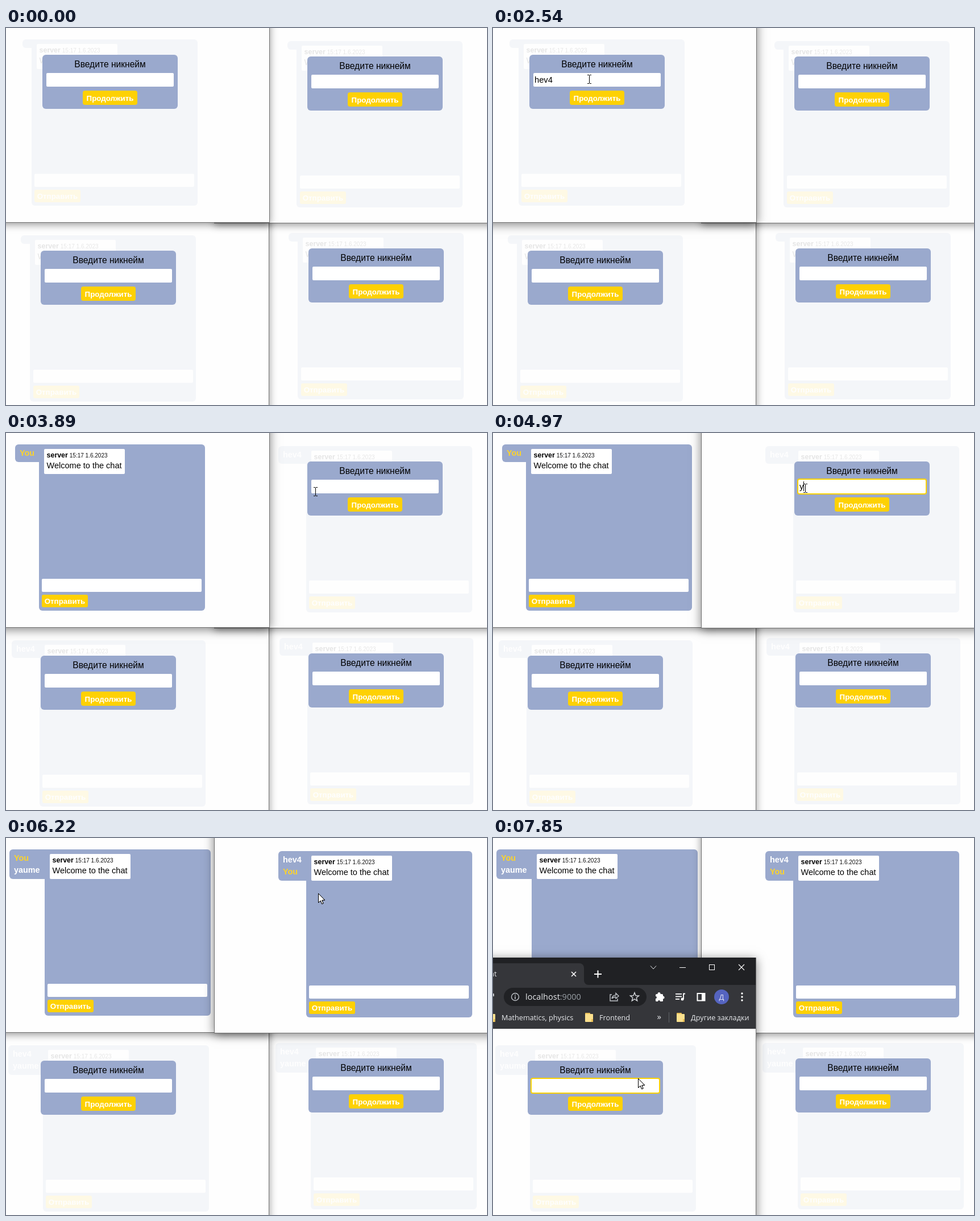
Recreate the animation shown at these times as an HTML page with a canvas. Size 846x662 px, loop 8000 ms.

```html
<!DOCTYPE html>
<html lang="ru">
<head>
<meta charset="utf-8">
<title>Chat windows</title>
<style>
html, body { margin: 0; width: 100%; height: 100%; overflow: hidden; background: #fefefe; }
canvas { display: block; }
</style>
</head>
<body>
<canvas id="stage" width="846" height="662"></canvas>
<script>
const ctx = document.getElementById('stage').getContext('2d');
const LOOP = 8000;
const SANS = '"Liberation Sans", Arial, sans-serif';
const UI = '"Open Sans", "Noto Sans", sans-serif';
const BLUE = '#9aa9cd', GOLD = '#fed103', PAGE = '#fefefe';
const FIRST = 'hev4', SECOND = 'yaume';

// Window rectangles as [left, top, right, bottom]; cx and dy place the chat inside.
const wins = {
  tl: { box: [-60, -60, 464, 342], cx: 183, dy: 0 },
  tr: { box: [366, -60, 920, 343], cx: 649.2, dy: 3 },
  bl: { box: [-60, 210, 463, 740], cx: 180.3, dy: 344 },
  br: { box: [440, 200, 920, 740], cx: 651.2, dy: 340 }
};

// Pointer stops: time, shape, x, y.
const pointer = [
  [0, ''], [370, 'arrow', 110, 143], [490, 'arrow', 158, 120],
  [640, 'beam', 169, 94], [790, 'beam', 169, 90], [2660, 'arrow', 168, 89],
  [3530, 'arrow', 232, 108], [3650, 'arrow', 352, 120],
  [3770, 'arrow', 474, 114], [3890, 'beam', 544, 103],
  [4040, 'beam', 549, 97], [6100, 'arrow', 549, 97],
  [6780, 'arrow', 478, 226], [6900, 'arrow', 371, 364],
  [7050, 'beam', 230, 429], [7480, 'arrow', 255, 422]
];

const keys = { tl: [1870, 2020, 2170, 2290], tr: [4970, 5120, 5370, 5520, 5800] };
const typedName = { tl: FIRST, tr: SECOND };
const focus = { tl: [940, 2540], tr: [4040, 5950], bl: [7330, LOOP] };
const caretOn = [[940, 1340], [1870, 2540], [4040, 4570], [4970, 5950], [7330, 7850]];

const within = (t, span) => span && t >= span[0] && t < span[1];

function rect(x, y, w, h, color, r = 0) {
  ctx.fillStyle = color;
  ctx.beginPath();
  ctx.roundRect(x, y, w, h, r);
  ctx.fill();
}

function text(str, x, y, font, color, align = 'left') {
  ctx.font = font;
  ctx.fillStyle = color;
  ctx.textAlign = align;
  ctx.fillText(str, x, y);
}

function line(points, color, width = 1, closed = false) {
  ctx.strokeStyle = color;
  ctx.lineWidth = width;
  ctx.beginPath();
  points.forEach(([x, y]) => ctx.lineTo(x, y));
  if (closed) ctx.closePath();
  ctx.stroke();
}

function disc(x, y, r, color) {
  ctx.fillStyle = color;
  ctx.beginPath();
  ctx.arc(x, y, r, 0, 7);
  ctx.fill();
}

function cross(x, y, r, color, width) {
  line([[x - r, y - r], [x + r, y + r]], color, width);
  line([[x - r, y + r], [x + r, y - r]], color, width);
}

function members(id, t) {
  const joined = id === 'tl' ? 6220 : 6100;
  const list = t >= joined ? [FIRST, SECOND] : t >= 2660 ? [FIRST] : [];
  const own = id === 'tl' ? FIRST : id === 'tr' && t >= 6220 ? SECOND : '';
  return list.map(name => name === own ? 'You' : name);
}

function drawChat(win, names) {
  const { cx, dy } = win;
  const bold = '700 14.4px ' + SANS;
  ctx.font = bold;
  const tabW = 16 + Math.max(0, ...names.map(n => ctx.measureText(n).width));
  const exact = cx + (tabW - 292) / 2;
  const x = Math.round(exact), left = Math.round(exact - tabW);
  const inner = Math.round(exact + 5.4);

  rect(left, 20 + dy, x - left, names.length ? 10 + 21 * names.length : 15, BLUE, [6, 0, 0, 6]);
  rect(x, 20 + dy, 292, 292, BLUE, [0, 6, 6, 6]);
  names.forEach((n, i) =>
    text(n, left + 8, 40 + 21 * i + dy, bold, n === 'You' ? '#fcd32c' : '#fff'));

  const mx = Math.round(exact + 9);
  rect(mx, 28 + dy, 142, 44, '#fff', 2);
  text('server', mx + 4.6, 43 + dy, '700 12.4px ' + SANS, '#000');
  text('15:17 1.6.2023', mx + 44.8, 43 + dy, '10px ' + SANS, '#111');
  text('Welcome to the chat', mx + 4.6, 62 + dy, '14.5px ' + SANS, '#000');

  rect(inner, 256 + dy, 281, 23, '#fff', 2);
  rect(inner, 284 + dy, 81, 22, GOLD, 3);
  text('Отправить', inner + 40.5, 299.5 + dy, '700 13.33px ' + SANS, '#fff', 'center');
}

function drawDialog(id, t) {
  const win = wins[id], dy = win.dy;
  const x = Math.round(win.cx) - 119, mid = x + 119;
  const field = x + 7, active = within(t, focus[id]);
  rect(x, 47 + dy, 238, 95, BLUE, 6);
  text('Введите никнейм', mid, 69 + dy, '15.6px ' + SANS, '#000', 'center');
  if (active) rect(field - 2, 77 + dy, 228, 28, GOLD, 4);
  rect(field, 79 + dy, 224, 24, '#fff', 2);

  const count = (keys[id] || []).filter(k => t >= k).length;
  const value = (typedName[id] || '').slice(0, count);
  const font = '14.7px ' + SANS;
  text(value, field + 2, 96 + dy, font, '#000');
  if (active && caretOn.some(span => within(t, span))) {
    rect(Math.round(field + 2 + ctx.measureText(value).width), 82 + dy, 1, 17, '#000');
  }

  rect(mid - 48, 110 + dy, 96, 25, GOLD, 4);
  text('Продолжить', mid, 128 + dy, '700 13.33px ' + SANS, '#fff', 'center');
}

function folder(x) {
  rect(x, 307, 9, 5, '#e9bf56', 1);
  rect(x, 309, 14, 14, '#fbe08d', 1);
  rect(x + 11, 318, 3, 5, '#e9bf56');
}

function drawBrowserBar() {
  const ink = '#e8eaed', bar = '#35363a', dark = '#202124';
  rect(-60, 210, 522, 48, dark);
  rect(-60, 258, 522, 77, bar);
  rect(-60, 220, 220, 38, bar, [0, 8, 0, 0]);
  rect(160, 250, 8, 8, bar);
  rect(160, 242, 16, 16, dark, [0, 0, 0, 8]);
  text('nt', -6, 243, '13px ' + UI, ink);
  cross(142, 239, 4, '#fff', 1.6);
  line([[178, 239], [191, 239]], '#fff', 2);
  line([[184.5, 232.5], [184.5, 245.5]], '#fff', 2);
  line([[277, 224.5], [282, 230], [287, 224.5]], ink);
  line([[328, 227.5], [339, 227.5]], '#fff');
  ctx.strokeRect(380.5, 222.5, 9, 9);
  cross(437, 227, 5, '#fff', 1.1);

  rect(19, 263, 251, 32, dark, 16);
  line([[-3, 274], [1, 274], [1, 278]], ink, 1.5);
  ctx.strokeStyle = '#bdc1c6';
  ctx.lineWidth = 1.4;
  ctx.beginPath();
  ctx.arc(39, 279, 6.5, 0, 7);
  ctx.stroke();
  rect(38.2, 278, 1.6, 5, '#bdc1c6');
  rect(38.2, 275, 1.6, 1.7, '#bdc1c6');
  const font = '14.5px ' + UI;
  text('localhost', 57, 284, font, ink);
  text(':9000', 57 + ctx.measureText('localhost').width, 284, font, '#9aa0a6');

  // share
  line([[209, 275], [206, 275], [206, 286], [219, 286], [219, 282]], '#bdc1c6', 1.4);
  ctx.beginPath();
  ctx.moveTo(209, 282);
  ctx.quadraticCurveTo(210, 276, 216, 276);
  ctx.lineTo(216, 272.5);
  ctx.lineTo(221, 277.5);
  ctx.lineTo(216, 282);
  ctx.lineTo(216, 279);
  ctx.quadraticCurveTo(212, 279, 209, 282);
  ctx.stroke();
  // star
  const star = Array.from({ length: 10 }, (_, i) => {
    const a = -Math.PI / 2 + i * Math.PI / 5, r = i % 2 ? 3.4 : 8;
    return [249 + r * Math.cos(a), 279.5 + r * Math.sin(a)];
  });
  line(star, '#d5d8dc', 1.4, true);
  // extensions
  rect(286, 274, 13, 13, '#fff', 1.5);
  disc(292, 273.5, 2.5, '#fff');
  disc(299, 280, 2.5, '#fff');
  disc(286, 280, 2, bar);
  disc(292, 287, 2, bar);
  // playlist
  [273, 277.5, 282].forEach((y, i) => rect(321, y, i < 2 ? 11 : 7, 1.8, '#fff'));
  line([[338, 273.5], [335, 273.5], [335, 283]], '#fff', 1.8);
  disc(333, 283, 2.5, '#fff');
  // side panel
  line([[359.5, 273], [372.5, 273], [372.5, 285.5], [359.5, 285.5]], '#fff', 2, true);
  rect(367, 273, 6, 13, '#fff');
  disc(402, 279, 13, '#5564c0');
  text('Д', 402, 283.5, '13px ' + UI, '#e4e6f5', 'center');
  [273, 279, 285].forEach(y => disc(438, y, 1.7, '#fff'));

  const mark = '12.7px ' + UI;
  folder(-10);
  text('Mathematics, physics', 15, 319.5, mark, ink);
  folder(162);
  text('Frontend', 187, 319.5, mark, ink);
  text('»', 288.5, 318.5, '15px ' + UI, ink);
  rect(309, 306, 1, 18, '#5f6368');
  folder(323);
  text('Другие закладки', 348, 319.5, mark, ink);
}

function drawWindow(id, t, front) {
  const win = wins[id], [l, top, r, b] = win.box;
  ctx.save();
  ctx.shadowColor = front ? 'rgba(0,0,0,.5)' : 'rgba(0,0,0,.42)';
  ctx.shadowBlur = front ? 17 : 13;
  ctx.shadowOffsetY = 3;
  rect(l, top, r - l, b - top, '#707070');
  ctx.restore();

  ctx.save();
  ctx.beginPath();
  ctx.rect(l + 1, top, r - l - 2, b - top - 1);
  ctx.clip();
  rect(l, top, r - l, b - top, PAGE);
  drawChat(win, members(id, t));
  const entered = id === 'tl' ? t >= 2660 : id === 'tr' && t >= 6220;
  if (!entered) {
    ctx.globalAlpha = 0.9;
    rect(l, top, r - l, b - top, PAGE);
    ctx.globalAlpha = 1;
    drawDialog(id, t);
  }
  if (id === 'bl') drawBrowserBar();
  ctx.restore();
}

function drawPointer(t) {
  const [, shape, x, y] = pointer.filter(p => t >= p[0]).pop();
  if (shape === 'arrow') {
    const outline = [[0, 0], [0, 16], [3.7, 12.6], [6.2, 18.3], [8.6, 17.3], [6.2, 11.8], [11.2, 11.5]]
      .map(([dx, dy]) => [x + 0.5 + dx, y + 0.5 + dy]);
    line(outline, '#000', 1, true);
    ctx.fillStyle = '#fff';
    ctx.fill();
    line(outline, '#000', 1, true);
  } else if (shape === 'beam') {
    rect(x, y - 7, 1, 14, '#000');
    for (const row of [y - 8, y + 7]) {
      rect(x - 3, row, 3, 1, '#000');
      rect(x + 1, row, 3, 1, '#000');
    }
  }
}

function draw(t) {
  const order = t >= 7330 ? ['br', 'tl', 'tr', 'bl']
    : t >= 4040 ? ['br', 'bl', 'tl', 'tr']
    : ['br', 'bl', 'tr', 'tl'];
  rect(0, 0, 846, 662, PAGE);
  order.forEach((id, i) => drawWindow(id, t, i === 3 && t >= 940));
  drawPointer(t);
}

const start = performance.now();
function tick() {
  draw((performance.now() - start) % LOOP);
  requestAnimationFrame(tick);
}
tick();
</script>
</body>
</html>
```
